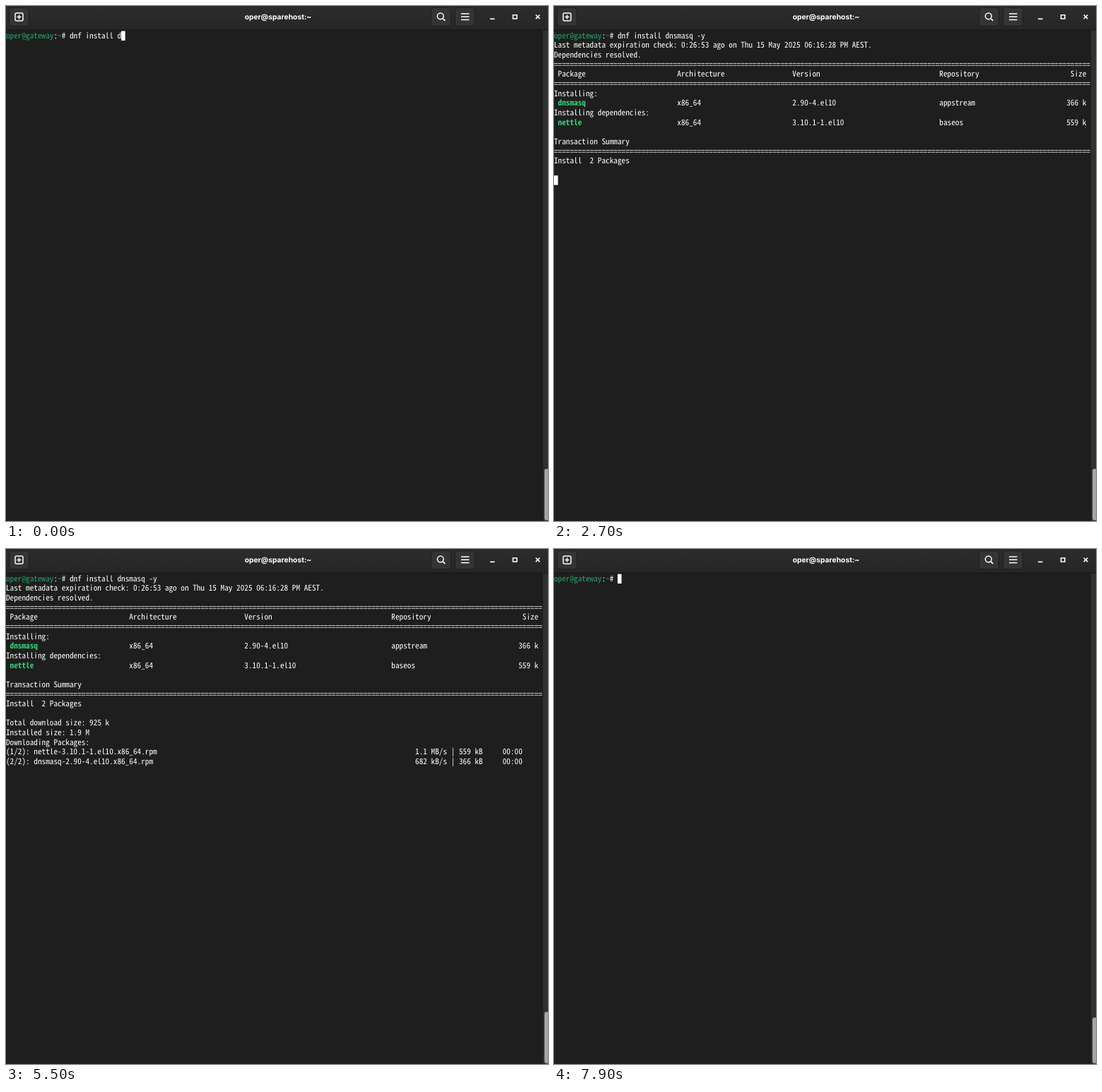
These frames come from a looping animation (767x730 px, 8000 ms). An HTML page with a canvas:

```html
<!DOCTYPE html>
<html lang="en">
<head>
<meta charset="utf-8">
<title>Terminal</title>
<style>
  html, body { margin: 0; width: 100%; height: 100%; overflow: hidden; background: #1e1e1e; }
  canvas { display: block; }
</style>
</head>
<body>
<canvas id="stage" width="767" height="730"></canvas>
<script>
const ctx = document.getElementById('stage').getContext('2d');
const LOOP = 8000, CLEAR = 7900;
const COLS = 135, CELL = 5.622, ROW = 13.65, TOP = 35.3, BASE = 10.4;
const BG = '#1e1e1e', WHITE = '#ffffff', GREEN = '#26a269', LIME = '#33d17a';
const MONO = '"Noto Sans Mono CJK JP", "Noto Sans Mono", monospace';
const HOST = 'oper@gateway', TITLE = 'oper@sparehost:~';
const COMMAND = 'dnf install dnsmasq -y';
const NETTLE = 'nettle-3.10.1-1.el10.x86_64', DNSMASQ = 'dnsmasq-2.90-4.el10.x86_64';

ctx.textRendering = 'geometricPrecision';
ctx.font = `100px ${MONO}`;
const fontSize = Math.min(11.25, 610 / ctx.measureText('M').width);

// [time, typed characters]
const typing = [[0, 13], [100, 14], [200, 15], [400, 16], [500, 17], [600, 18],
  [1000, 19], [1600, 20], [2000, 21], [2200, 22]];
// [time, row, column]
const cursorStops = [[2300, 1, 0], [2700, 15, 0], [2800, 18, 0], [5900, 28, 134],
  [6000, 32, 0], [6800, 37, 16], [CLEAR, 0, 16]];
const cursorHidden = [[1500, 1600], [2900, 3500], [4100, 4700], [5300, 5900], [6500, 7000]];

const output = [];
function put(from, row, col, text, { to = CLEAR, color = WHITE, bold = false } = {}) {
  output.push({ from, to, row, col, text, color, bold });
}
function rule(from, row, char) {
  put(from, row, 0, char.repeat(COLS));
}
function tableRow(row, cells) {
  [1, 31, 60, 97].forEach((col, i) => {
    const name = i === 0 && row > 4;
    put(2700, row, col, cells[i], name ? { color: LIME, bold: true } : {});
  });
  put(2700, row, 134 - cells[4].length, cells[4]);
}
function transfer(from, row, label, stats, to) {
  put(from, row, 0, label, { to });
  put(from, row, 103, stats, { to });
}
function progress(from, to, label, percent, bar, stats) {
  transfer(from, 18, label, stats + ' ETA', to);
  put(from, 18, 48, `${percent.padStart(4)} [${bar.padEnd(47)}]`, { to });
}
function step(from, row, label, name, count, to) {
  put(from, row, 2, label.padEnd(17) + ': ' + name, { to });
  put(from, row, 131, count, { to });
}

put(2700, 1, 0, 'Last metadata expiration check: 0:26:53 ago on Thu 15 May 2025 06:16:28 PM AEST.');
put(2700, 2, 0, 'Dependencies resolved.');
[3, 5, 12].forEach(row => rule(2700, row, '='));
tableRow(4, ['Package', 'Architecture', 'Version', 'Repository', 'Size']);
put(2700, 6, 0, 'Installing:');
tableRow(7, ['dnsmasq', 'x86_64', '2.90-4.el10', 'appstream', '366 k']);
put(2700, 8, 0, 'Installing dependencies:');
tableRow(9, ['nettle', 'x86_64', '3.10.1-1.el10', 'baseos', '559 k']);
put(2700, 11, 0, 'Transaction Summary');
put(2700, 13, 0, 'Install  2 Packages');

put(2800, 15, 0, 'Total download size: 925 k');
put(2800, 16, 0, 'Installed size: 1.9 M');
put(2800, 17, 0, 'Downloading Packages:');
const idle = '---  B/s |   0  B     --:--';
progress(2800, 3500, '', '', '===', idle);
progress(3500, 4000, '', '', '   ===', idle);
progress(4000, 4100, '', '', '      ===', idle);
progress(4100, 4500, '', '92%', '='.repeat(43), ' 35 kB/s |  16 kB     00:00');
progress(4500, 5100, '', '0%', '', ' 35 kB/s |   0  B     00:00');
progress(5100, 5500, `(1-2/2): ${NETTLE}.rpm`, '2%', '=', ' 35 kB/s |  20 kB     00:25');
transfer(5500, 18, `(1/2): ${NETTLE}.rpm`, '1.1 MB/s | 559 kB     00:00');
transfer(5500, 19, `(2/2): ${DNSMASQ}.rpm`, '682 kB/s | 366 kB     00:00');
rule(5600, 20, '-');
transfer(5600, 21, 'Total', '315 kB/s | 925 kB     00:02');
put(5600, 22, 0, 'Running transaction check');
put(5700, 23, 0, 'Transaction check succeeded.');
put(5700, 24, 0, 'Running transaction test');
put(5800, 25, 0, 'Transaction test succeeded.');
put(5800, 26, 0, 'Running transaction');
step(5800, 27, 'Preparing', '', '1/1');
step(5900, 28, 'Installing', `${NETTLE} [`, '1/2', 6000);
put(5900, 28, 129, ']', { to: 6000 });
step(6000, 28, 'Installing', NETTLE, '1/2');
step(6000, 29, 'Running scriptlet', DNSMASQ, '2/2');
step(6000, 30, 'Installing', DNSMASQ, '2/2');
step(6000, 31, 'Running scriptlet', DNSMASQ, '2/2');
put(6800, 33, 0, 'Installed:');
put(6800, 34, 2, DNSMASQ);
put(6800, 34, 68, NETTLE);
put(6800, 36, 0, 'Complete!');

function latest(stops, t) {
  return stops.filter(stop => stop[0] <= t).pop();
}

function write(row, col, text, color = WHITE, bold = false) {
  ctx.font = `${bold ? 'bold ' : ''}${fontSize}px ${MONO}`;
  ctx.textAlign = 'left';
  ctx.fillStyle = color;
  [...text].forEach((char, i) => {
    if (char !== ' ') ctx.fillText(char, (col + i) * CELL, TOP + row * ROW + BASE);
  });
}

function prompt(row) {
  write(row, 0, HOST, GREEN);
  write(row, 12, ':');
  write(row, 13, '~', GREEN);
  write(row, 14, '#');
}

function box(x, y, w, h, r, fill, stroke) {
  ctx.beginPath();
  ctx.roundRect(x, y, w, h, r);
  if (fill) { ctx.fillStyle = fill; ctx.fill(); }
  if (stroke) { ctx.strokeStyle = stroke; ctx.stroke(); }
}

function lines(width, ...segments) {
  ctx.lineWidth = width;
  ctx.strokeStyle = WHITE;
  ctx.beginPath();
  for (const [x1, y1, x2, y2] of segments) {
    ctx.moveTo(x1, y1);
    ctx.lineTo(x2, y2);
  }
  ctx.stroke();
}

function drawHeader() {
  const shade = ctx.createLinearGradient(0, 0, 0, 34);
  shade.addColorStop(0, '#2c2c2c');
  shade.addColorStop(1, '#262626');
  ctx.fillStyle = shade;
  ctx.fillRect(0, 0, 767, 34);
  ctx.fillStyle = '#151515';
  ctx.fillRect(0, 33.5, 767, 1);

  ctx.lineWidth = 1;
  for (const x of [4.5, 601.5, 635.5]) box(x, 2.5, 28, 26, 4, '#343434', '#1d1d1d');

  ctx.lineWidth = 1.5;
  box(13, 10, 11, 11, 2, null, WHITE);
  lines(1.5, [15.5, 15.5, 21.5, 15.5], [18.5, 12.5, 18.5, 18.5]);

  ctx.lineWidth = 1.5;
  ctx.beginPath();
  ctx.arc(614.8, 14.3, 4.4, 0, Math.PI * 2);
  ctx.stroke();
  lines(1.7, [617.8, 17.3, 621.3, 20.8]);

  lines(1.5, [644, 11, 655.5, 11], [644, 15.3, 655.5, 15.3], [644, 19.5, 655.5, 19.5]);
  lines(1.7, [685, 18.3, 691.5, 18.3]);
  ctx.lineWidth = 1.6;
  box(717.5, 12.8, 5.4, 5.2, 0, null, WHITE);
  lines(1.6, [749.7, 12.5, 755.3, 18.1], [755.3, 12.5, 749.7, 18.1]);

  ctx.font = 'bold 10.3px Inter, sans-serif';
  ctx.textAlign = 'center';
  ctx.fillStyle = WHITE;
  ctx.fillText(TITLE, 385, 18.7);
}

function drawCursor(t, row, col) {
  if (cursorHidden.some(([from, to]) => t >= from && t < to)) return;
  ctx.fillStyle = WHITE;
  ctx.fillRect(col * CELL, TOP + row * ROW + 0.2, CELL, ROW - 0.2);
  const under = output.find(o => t >= o.from && t < o.to && o.row === row &&
    col >= o.col && col < o.col + o.text.length);
  if (under) write(row, col, under.text[col - under.col], BG);
}

function draw(t) {
  ctx.fillStyle = BG;
  ctx.fillRect(0, 0, 767, 730);
  drawHeader();

  ctx.fillStyle = '#303030';
  ctx.fillRect(760, 34.5, 7, 696);
  const thumb = t < CLEAR ? 656 : 664;
  box(762, thumb, 6, 729 - thumb, 3, '#a4a4a4');

  const typed = latest(typing, t)[1];
  prompt(0);
  if (t < CLEAR) write(0, 16, COMMAND.slice(0, typed));
  for (const o of output) {
    if (t >= o.from && t < o.to) write(o.row, o.col, o.text, o.color, o.bold);
  }
  if (t >= 6800 && t < CLEAR) prompt(37);

  const [, row, col] = latest(cursorStops, t) || [0, 0, 16 + typed];
  drawCursor(t, row, col);
}

const start = performance.now();
function tick() {
  draw((performance.now() - start) % LOOP);
  requestAnimationFrame(tick);
}
tick();
</script>
</body>
</html>
```
